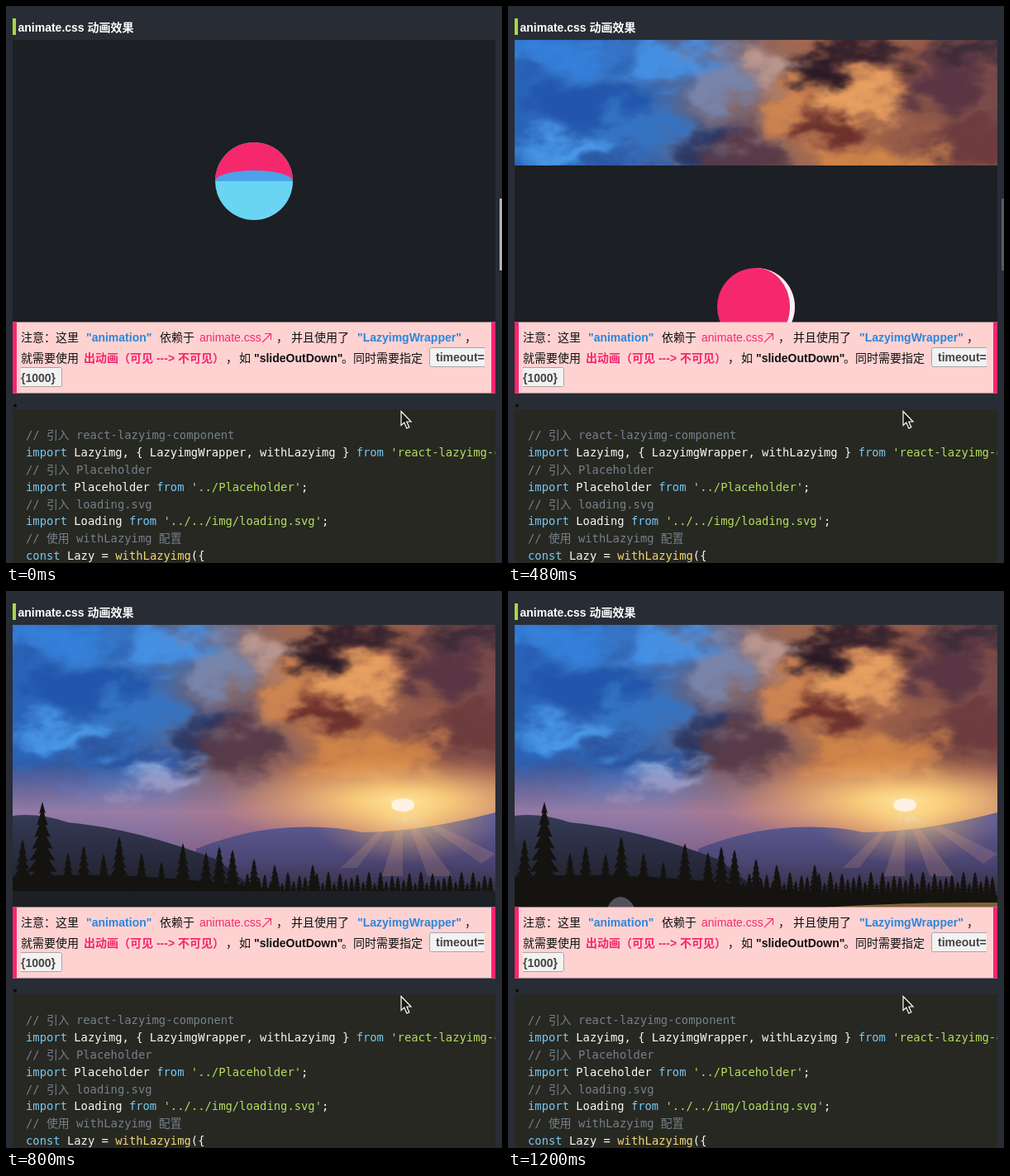
Animation, 600 px wide and 674 px high, one loop 1280 ms. Source, as an HTML page:

```html
<!DOCTYPE html>
<html lang="zh">
<head>
<meta charset="utf-8">
<style>
html, body { margin: 0; width: 100%; height: 100%; overflow: hidden; background: #282c34; }
svg { display: block; }
text { font: 14px "Liberation Sans", "Noto Sans CJK SC", "Noto Sans CJK", sans-serif; white-space: pre; }
.b { font-weight: bold; }
.blue { fill: #2b86dc; }
.pink { fill: #f5286e; }
.code text { font: 13.84px "DejaVu Sans Mono", "Noto Sans CJK SC", "Noto Sans CJK", monospace; fill: #f8f8f2; }
.code .c { fill: #75808c; }
.k { fill: #78c8f2; }
.s { fill: #b2de5c; }
.f { fill: #f0d672; }
</style>
</head>
<body>
<svg width="600" height="674" viewBox="0 0 600 674">
  <defs>
    <clipPath id="frame"><rect x="8" y="41" width="584" height="342"/></clipPath>
    <clipPath id="codeBox"><rect x="8" y="488" width="584" height="186"/></clipPath>
    <linearGradient id="sky">
      <stop offset="0" stop-color="#2460b8"/><stop offset=".3" stop-color="#366cb8"/>
      <stop offset=".46" stop-color="#74606c"/><stop offset=".62" stop-color="#b06c48"/>
      <stop offset="1" stop-color="#69404a"/>
    </linearGradient>
    <linearGradient id="dusk" x2="0" y2="1">
      <stop offset="0" stop-color="#b98098" stop-opacity="0"/><stop offset=".55" stop-color="#b8829f"/>
      <stop offset="1" stop-color="#8d6490"/>
    </linearGradient>
    <radialGradient id="glow">
      <stop offset="0" stop-color="#fff2b0"/><stop offset=".25" stop-color="#ffd880" stop-opacity=".9"/>
      <stop offset="1" stop-color="#f09a50" stop-opacity="0"/>
    </radialGradient>
    <linearGradient id="hill" x2="0" y2="1">
      <stop offset="0" stop-color="#5f5f9a"/><stop offset=".5" stop-color="#4c4674"/>
      <stop offset="1" stop-color="#2b2430"/>
    </linearGradient>
    <linearGradient id="slope" x2="0" y2="1">
      <stop offset="0" stop-color="#353a56"/><stop offset="1" stop-color="#1a1a20"/>
    </linearGradient>
    <filter id="cloud" filterUnits="userSpaceOnUse" x="-40" y="0" width="680" height="330" color-interpolation-filters="sRGB">
      <feGaussianBlur in="SourceGraphic" stdDeviation="9" result="soft"/>
      <feTurbulence type="fractalNoise" baseFrequency=".018 .03" numOctaves="4" seed="4"/>
      <feDisplacementMap in="soft" scale="75" xChannelSelector="R" yChannelSelector="G"/>
    </filter>
  </defs>

  <rect width="600" height="674" fill="#282c34"/>
  <rect x="8" y="15" width="4" height="20" fill="#a6d94a"/>
  <text class="b" x="14.5" y="31" fill="#fff">animate.css 动画效果</text>

  <g clip-path="url(#frame)">
    <g id="clouds" filter="url(#cloud)"><rect x="-60" y="-20" width="720" height="370" fill="url(#sky)"/></g>
    <rect x="8" y="210" width="584" height="105" fill="url(#dusk)" opacity=".75"/>
    <ellipse cx="480" cy="254" rx="225" ry="58" fill="url(#glow)"/>
    <path d="M230 312 Q290 288 345 286 Q395 284 430 292 Q500 292 592 268 V383 H230Z" fill="url(#hill)"/>
    <path d="M8 272 Q40 268 75 280 Q160 288 255 325 L330 383 H8Z" fill="url(#slope)"/>
    <ellipse cx="485" cy="276" rx="115" ry="55" fill="url(#glow)" opacity=".55"/>
    <path d="M480 262L405 335H425ZM480 262L455 345H480ZM480 262L510 345H540ZM480 262L575 330L592 318Z" fill="#ffb080" opacity=".16"/>
    <ellipse cx="480" cy="259" rx="14" ry="8" fill="#fff2e2"/>
    <path d="M8 346 Q150 338 300 358 T592 368 V383 H8Z" fill="#15130f"/>
    <path id="trees" fill="#14130f"/>
    <path d="M120 383Q126 370 137 370Q148 372 153 383Z" fill="#55505a"/>
    <path d="M380 383Q500 376 592 377V383Z" fill="#806038"/>

    <g id="cover">
      <rect x="8" y="41" width="584" height="342" fill="#1c1f24"/>
      <g id="coin">
        <circle r="47"/><path d="M-47 0A47 47 0 0 1 47 0Z"/><path/>
      </g>
    </g>
  </g>

  <rect x="8" y="382.500" width="584" height="86" fill="#ffd2d2"/>
  <path d="M8 382.500h5v86h-5zM587 382.500h5v86h-5z" fill="#f92672"/>
  <g fill="#f2f2f2" stroke="#a9a3a5">
    <path d="M579 413.500H514.500a2 2 0 0 0-2 2V434.500a2 2 0 0 0 2 2H579"/>
    <path d="M18 437.500H65.500a2 2 0 0 1 2 2V458.500a2 2 0 0 1-2 2H18"/>
  </g>
  <g fill="#111">
    <text x="18" y="406">注意：这里</text>
    <text class="b blue" x="97" y="406">"animation"</text>
    <text x="186" y="406">依赖于</text>
    <text class="pink" x="234" y="406">animate.css</text>
    <path d="M310 407L320 397M313 396.500H320.500V404" fill="none" stroke="#f5286e" stroke-width="1.100"/>
    <text x="327" y="406">，</text>
    <text x="345" y="406">并且使用了</text>
    <text class="b blue" x="425" y="406">"LazyimgWrapper"</text>
    <text x="555" y="406">，</text>
    <text x="18" y="431">就需要使用</text>
    <text class="b pink" x="94" y="431">出动画（可见 ---&gt; 不可见）</text>
    <text x="266" y="431">，</text>
    <text x="282" y="431">如</text>
    <text class="b" x="300" y="431">"slideOutDown"</text>
    <text x="406" y="431">。同时需要指定</text>
    <text class="b" x="520" y="430" fill="#444">timeout=</text>
    <text class="b" x="18" y="455" fill="#444">{1000}</text>
  </g>

  <circle cx="11" cy="483.500" r="2" fill="#0c0d10"/>
  <rect x="8" y="488" width="584" height="186" fill="#272822"/>
  <g class="code" clip-path="url(#codeBox)">
    <text class="c" x="24" y="524">// 引入 react-lazyimg-component</text>
    <text x="24" y="545"><tspan class="k">import</tspan> Lazyimg, { LazyimgWrapper, withLazyimg } <tspan class="k">from</tspan> <tspan class="s">'react-lazyimg-component'</tspan>;</text>
    <text class="c" x="24" y="566">// 引入 Placeholder</text>
    <text x="24" y="586.500"><tspan class="k">import</tspan> Placeholder <tspan class="k">from</tspan> <tspan class="s">'../Placeholder'</tspan>;</text>
    <text class="c" x="24" y="607.500">// 引入 loading.svg</text>
    <text x="24" y="628"><tspan class="k">import</tspan> Loading <tspan class="k">from</tspan> <tspan class="s">'../../img/loading.svg'</tspan>;</text>
    <text class="c" x="24" y="649">// 使用 withLazyimg 配置</text>
    <text x="24" y="669.500"><tspan class="k">const</tspan> Lazy = <tspan class="f">withLazyimg</tspan>({</text>
  </g>

  <rect id="bar" x="597" y="233" width="3" height="87" fill="#b5b2b7"/>
  <path d="M478 490.500V507.500L481.800 504L484.800 511L487.800 509.700L484.800 503H490Z" fill="#1a1a1a" stroke="#fff" stroke-width="1.200"/>
</svg>
<script>
const $ = id => document.getElementById(id);

// Clouds: x, y, rx, ry, colour
const clouds = [
  [60, 55, 70, 22, "#3580da"], [190, 65, 50, 22, "#4590e4"], [90, 115, 80, 28, "#2156ac"],
  [255, 90, 34, 36, "#7884aa"], [70, 175, 65, 14, "#4c9cec"], [150, 202, 70, 12, "#29509a"],
  [195, 226, 50, 12, "#97b0e0"], [40, 230, 60, 16, "#38579a"], [160, 150, 50, 20, "#3474c4"],
  [235, 180, 26, 32, "#2c3763"], [285, 190, 42, 36, "#583a48"], [315, 70, 26, 26, "#b8958e"],
  [335, 125, 42, 24, "#cf8450"], [425, 112, 42, 24, "#e8a060"], [440, 200, 80, 22, "#d08448"],
  [372, 80, 32, 24, "#2a1a26"], [430, 58, 55, 18, "#33202c"], [390, 150, 32, 18, "#6a2f2c"],
  [525, 95, 55, 32, "#5a3644"], [560, 50, 45, 16, "#3a2a38"], [555, 165, 55, 30, "#6c3c3e"]
];
for (const [x, y, rx, ry, fill] of clouds) {
  const e = document.createElementNS("http://www.w3.org/2000/svg", "ellipse");
  Object.entries({ cx: x, cy: y, rx, ry, fill }).forEach(([k, v]) => e.setAttribute(k, v));
  $("clouds").append(e);
}

// A fir is a zigzag that widens towards the ground
function fir(x, top) {
  const h = 383 - top, n = 9, left = [], right = [];
  for (let i = 1; i <= n; i++) {
    const y = top + h * i / n, w = h * .2 * i / n + 1;
    right.push(`${x + w} ${y} ${x + w * .5} ${y - 1}`);
    left.unshift(`${x - w * .5} ${y - 1} ${x - w} ${y}`);
  }
  return `M${x} ${top}L${right.join(" ")} ${left.join(" ")}Z`;
}
const firs = [[20, 300], [44, 255], [75, 317], [94, 308], [118, 318], [137, 297], [164, 317], [188, 328],
  [214, 305], [242, 316], [258, 309], [274, 313], [300, 324], [325, 331], [371, 331]];
for (let x = 285; x < 592; x += 7) firs.push([x, 346 + 7 * Math.sin(x * 2.3)]);
$("trees").setAttribute("d", firs.map(p => fir(...p)).join(""));

// Linear interpolation through [time, value] points
function track(t, points) {
  if (t <= points[0][0]) return points[0][1];
  for (let i = 1; i < points.length; i++) {
    const [a, u] = points[i - 1], [b, v] = points[i];
    if (t <= b) return u + (v - u) * (t - a) / (b - a);
  }
  return points.at(-1)[1];
}

// CSS "ease": cubic-bezier(.25, .1, .25, 1)
function ease(x) {
  let lo = 0, hi = 1;
  const curve = (s, a, b) => 3 * a * s * (1 - s) ** 2 + 3 * b * s * s * (1 - s) + s ** 3;
  for (let i = 0; i < 24; i++) {
    const s = (lo + hi) / 2;
    if (curve(s, .25, .25) < x) lo = s; else hi = s;
  }
  return curve(lo, .1, 1);
}

// A half disc folds over the middle; each fold turns the axis by 90 degrees
function drawCoin(angle) {
  const turn = Math.floor(angle / 180);
  const [rest, shown, front, back] = turn
    ? ["#f5286e", "#f4f4f8", "#f5286e", "#f4f4f8"]
    : ["#69d5f3", "#f5286e", "#4ba2e9", "#f5286e"];
  const k = Math.cos((angle - turn * 180) * Math.PI / 180);
  const [disc, half, flap] = $("coin").children;
  disc.setAttribute("fill", rest);
  half.setAttribute("fill", shown);
  flap.setAttribute("fill", k > 0 ? front : back);
  flap.setAttribute("d", `M-47 0A47 ${47 * Math.abs(k)} 0 0 ${k > 0 ? 1 : 0} 47 0Z`);
  $("coin").setAttribute("transform", `translate(300 212) rotate(${turn * 90})`);
}

let last = -1;
function draw(now) {
  const t = Math.floor(now % 1280 / 80) * 80;
  if (t !== last) {
    last = t;
    const p = track(t, [[160, 0], [320, .13], [480, .267], [640, .5], [800, .7], [1040, 1]]);
    $("cover").setAttribute("transform", `translate(0 ${Math.round(342 * ease(p))})`);
    drawCoin(track(t, [[0, 74], [320, 138], [480, 209], [560, 245]]));
    $("bar").setAttribute("opacity", track(t, [[240, 1], [320, .88], [480, .35], [600, 0]]));
  }
  requestAnimationFrame(draw);
}
draw(performance.now());
</script>
</body>
</html>
```
